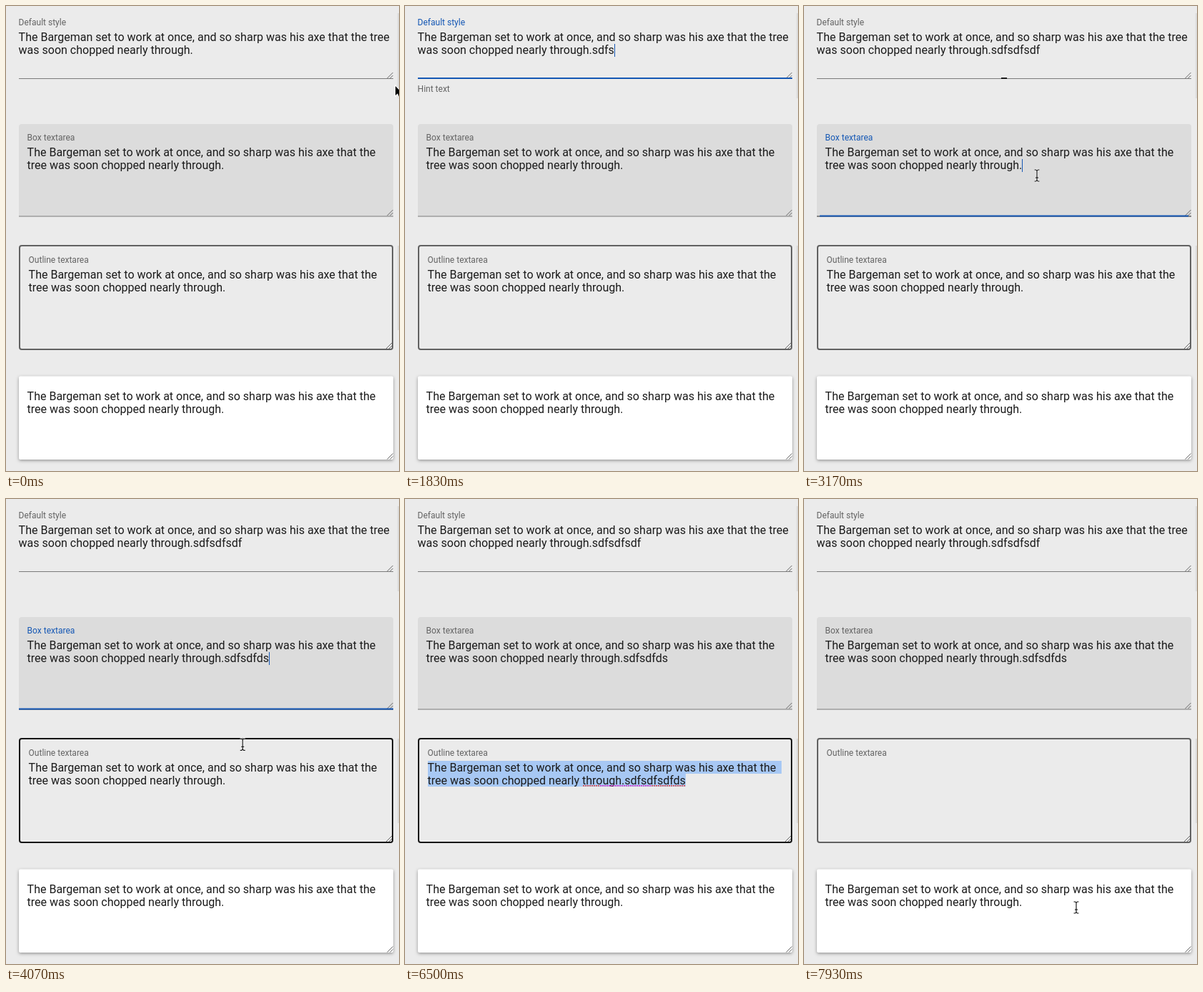
An HTML page with a canvas for the animation above (8 s loop, 550 by 650 pixels).

```html
<!DOCTYPE html>
<html lang="en">
<head>
<meta charset="utf-8">
<title>Text areas</title>
<style>
html, body { margin: 0; width: 100%; height: 100%; overflow: hidden; background: #ebebeb; }
canvas { display: block; width: 550px; height: 650px; }
</style>
</head>
<body>
<canvas id="stage" width="550" height="650"></canvas>
<script>
const ctx = document.getElementById('stage').getContext('2d');
const LOOP = 8000, RIPPLE = 180, BLINK = 500;
const LEFT = 18, RIGHT = 542, WIDTH = RIGHT - LEFT;
const INK = '#1b1b1b', MUTED = '#636363', BLUE = '#1457b4';
const BODY = '16px Roboto, sans-serif', SMALL = '12px Roboto, sans-serif';
const OPENING = 'The Bargeman set to work at once, and so sharp was his axe that the';
const ENDING = 'was soon chopped nearly through.';

const plain = {
  x: 17.6, base: 49, first: OPENING + ' tree', second: ENDING,
  typed: 'sdfsdfsdf', keys: [1570, 1600, 1630, 1830, 1900, 1960, 2030, 2100, 2160],
  label: 'Default style', labelBase: 27, top: 10, bottom: 102, focus: 879, blur: 3020, accent: BLUE
};
const box = {
  x: 29.6, base: 210, first: OPENING, second: 'tree ' + ENDING,
  typed: 'sdfsdfds', keys: [...Array(8).keys()].map(i => 3500 + i * 50),
  label: 'Box textarea', labelBase: 188, top: 172, bottom: 294, focus: 3020, blur: 4300, accent: BLUE
};
const outline = {
  x: 31.6, base: 381, first: OPENING, second: 'tree ' + ENDING,
  typed: 'sdfsdfsdfds', keys: [...Array(11).keys()].map(i => i < 6 ? 4730 + i * 60 : 5100 + (i - 6) * 75),
  label: 'Outline textarea', labelBase: 359, top: 334, bottom: 481, focus: 4300, blur: 7200, accent: INK
};
const card = { x: 29.6, base: 551, first: OPENING, second: 'tree ' + ENDING };
const SELECT = 5770, SPELL = 5900, CLEAR = 6530;

// Each run of pointer movement: [time, x, y], then the time it is hidden.
const pointerRuns = [
  { path: [[0, 545, 112], [30, 545, 112], [300, 520, 88], [520, 497, 64], [830, 493, 83]], hide: 1830 },
  { path: [[2270, 493, 83], [2530, 336, 170], [2900, 326, 237]], hide: 3600 },
  { path: [[3900, 326, 237], [4130, 333, 380], [4500, 341, 436]], hide: 5120 },
  { path: [[6560, 347, 436], [6800, 560, 400]], hide: 6800 },
  { path: [[7370, 550, 506], [7600, 470, 530], [7930, 381, 571]], hide: LOOP }
];

const clamp = v => Math.max(0, Math.min(1, v));

// cubic-bezier(.4, 0, .2, 1)
function ease(v) {
  v = clamp(v);
  let lo = 0, hi = 1, s = .5;
  for (let i = 0; i < 18; i++) {
    s = (lo + hi) / 2;
    const x = 1.2 * s * (1 - s) ** 2 + .6 * s * s * (1 - s) + s ** 3;
    if (x < v) lo = s; else hi = s;
  }
  return 3 * s * s * (1 - s) + s ** 3;
}

function pointerAt(t) {
  const run = pointerRuns.filter(r => r.path[0][0] <= t).pop();
  const path = run.path;
  let [, x, y] = path[path.length - 1];
  for (let i = 1; i < path.length; i++) {
    const a = path[i - 1], b = path[i];
    if (t < b[0]) {
      const k = (t - a[0]) / (b[0] - a[0]);
      x = a[1] + (b[1] - a[1]) * k;
      y = a[2] + (b[2] - a[2]) * k;
      break;
    }
  }
  return { x, y, shown: t < run.hide };
}

const isOver = (f, p) => p.x >= LEFT && p.x <= RIGHT && p.y >= f.top && p.y <= f.bottom;
const hasFocus = (f, t) => t >= f.focus && t < f.blur;

function fill(color, x, y, w, h) {
  ctx.fillStyle = color;
  ctx.fillRect(x, y, w, h);
}

function write(text, x, y, font, color) {
  ctx.font = font;
  ctx.fillStyle = color;
  ctx.fillText(text, x, y);
}

function widthOf(text) {
  ctx.font = BODY;
  return ctx.measureText(text).width;
}

function strokePath(points, color, width) {
  ctx.strokeStyle = color;
  ctx.lineWidth = width;
  ctx.beginPath();
  points.forEach(([x, y], i) => i ? ctx.lineTo(x, y) : ctx.moveTo(x, y));
  ctx.stroke();
}

function grip(right, bottom) {
  strokePath([[right - 8, bottom], [right, bottom - 8]], '#555', .9);
  strokePath([[right - 4, bottom], [right, bottom - 4]], '#555', .9);
}

function paragraph(f, t) {
  const count = f.keys ? f.keys.filter(k => k <= t).length : 0;
  const second = f.second + (count ? f.typed.slice(0, count) : '');
  write(f.first, f.x, f.base, BODY, INK);
  write(second, f.x, f.base + 18, BODY, INK);
  if (f.keys && hasFocus(f, t)) {
    const last = count ? f.keys[count - 1] : f.focus;
    caret(f, t - last, f.x + widthOf(second), f.base + 4);
  }
}

function caret(f, age, x, y) {
  if (Math.floor(age / BLINK) % 2 === 0) fill(f.accent, Math.round(x - .2), y, 1, 18);
}

function label(f, t) {
  const active = f !== outline && hasFocus(f, t);
  write(f.label, f.x, f.labelBase, SMALL, active ? f.accent : MUTED);
}

function underline(f, y, t, pointer) {
  const focused = hasFocus(f, t);
  fill(focused || isOver(f, pointer) ? '#252525' : '#7b7b7b', LEFT, y, WIDTH, 1);
  const grow = ease((t - f.focus) / RIPPLE) - ease((t - f.blur) / RIPPLE);
  if (grow > 0) fill(focused ? f.accent : INK, 280 - WIDTH / 2 * grow, y - 1, WIDTH * grow, 2);
  return grow;
}

function drawPlain(t, pointer) {
  label(plain, t);
  paragraph(plain, t);
  grip(541.5, 101);
  const grow = underline(plain, 101, t, pointer);
  if (grow > 0) {
    ctx.save();
    ctx.beginPath();
    ctx.rect(LEFT - 2, 108, WIDTH, 20);
    ctx.clip();
    write('Hint text', plain.x, 120 - 16 * (1 - grow), SMALL, MUTED);
    ctx.restore();
  }
}

function drawBox(t, pointer) {
  ctx.fillStyle = '#dcdcdc';
  ctx.beginPath();
  ctx.roundRect(LEFT, 165, WIDTH, 129, [4, 4, 0, 0]);
  ctx.fill();
  label(box, t);
  paragraph(box, t);
  grip(541.5, 293);
  underline(box, 293.5, t, pointer);
}

function drawSelection(t) {
  const end = outline.x + widthOf(outline.second + outline.typed);
  fill('#a7c8f4', 32, 366, 495, 18);
  fill('#a7c8f4', 32, 384, end - 32, 18);
  write(outline.first, outline.x, outline.base, BODY, INK);
  write(outline.second + outline.typed, outline.x, outline.base + 18, BODY, INK);
  if (t < SPELL) return;
  for (let x = 249; x < end; x += 3) {
    fill(x > 270 && x < 345 ? '#d92fc4' : '#e2463f', x, 400, 2, 1.6);
  }
}

function drawOutline(t, pointer) {
  ctx.strokeStyle = isOver(outline, pointer) ? '#151515' : '#616161';
  ctx.lineWidth = 2;
  ctx.beginPath();
  ctx.roundRect(LEFT + 1, 335, WIDTH - 2, 145, 3);
  ctx.stroke();
  grip(540, 479);
  label(outline, t);
  if (t < SELECT) paragraph(outline, t);
  else if (t < CLEAR) drawSelection(t);
  else if (hasFocus(outline, t)) caret(outline, t - CLEAR, 32, 367);
}

function drawCard(t) {
  ctx.save();
  ctx.shadowColor = 'rgba(0,0,0,.38)';
  ctx.shadowBlur = 4;
  ctx.shadowOffsetY = 1.5;
  ctx.fillStyle = '#fff';
  ctx.beginPath();
  ctx.roundRect(LEFT, 517.5, WIDTH, 116.5, 2);
  ctx.fill();
  ctx.restore();
  paragraph(card, t);
  grip(541.5, 633.5);
}

function drawEdgeShadows() {
  const shade = ctx.createLinearGradient(547, 0, 550, 0);
  shade.addColorStop(0, 'rgba(0,0,0,0)');
  shade.addColorStop(1, 'rgba(0,0,0,.1)');
  fill(shade, 547, 10, 3, 119);
  fill(shade, 547, 335, 3, 118);
}

function drawPointer({ x, y, shown }) {
  if (!shown) return;
  const overText = [plain, box, outline].some(f => isOver(f, { x, y })) ||
    (x < RIGHT && (y > 517 || (y > 165 && y < 172)));
  ctx.save();
  ctx.translate(x, y);
  if (overText) {
    for (const [color, width] of [['rgba(255,255,255,.8)', 2.6], [INK, 1.2]]) {
      strokePath([[-3.5, -8], [-1.5, -8], [0, -6.8], [1.5, -8], [3.5, -8]], color, width);
      strokePath([[0, -6.8], [0, 6.8]], color, width);
      strokePath([[-3.5, 8], [-1.5, 8], [0, 6.8], [1.5, 8], [3.5, 8]], color, width);
      strokePath([[-2, 3], [2, 3]], color, width);
    }
  } else {
    ctx.beginPath();
    [[0, 0], [0, 13], [3, 10.3], [5, 15], [7.3, 14], [5.3, 9.5], [9.3, 9.5]]
      .forEach(([px, py]) => ctx.lineTo(px, py));
    ctx.closePath();
    ctx.strokeStyle = '#fff';
    ctx.lineWidth = 2;
    ctx.stroke();
    ctx.fillStyle = '#000';
    ctx.fill();
  }
  ctx.restore();
}

function draw(t) {
  const pointer = pointerAt(t);
  fill('#ebebeb', 0, 0, 550, 650);
  drawEdgeShadows();
  drawPlain(t, pointer);
  drawBox(t, pointer);
  drawOutline(t, pointer);
  drawCard(t);
  drawPointer(pointer);
}

const start = performance.now();
function tick() {
  draw((performance.now() - start) % LOOP);
  requestAnimationFrame(tick);
}
tick();
</script>
</body>
</html>
```
